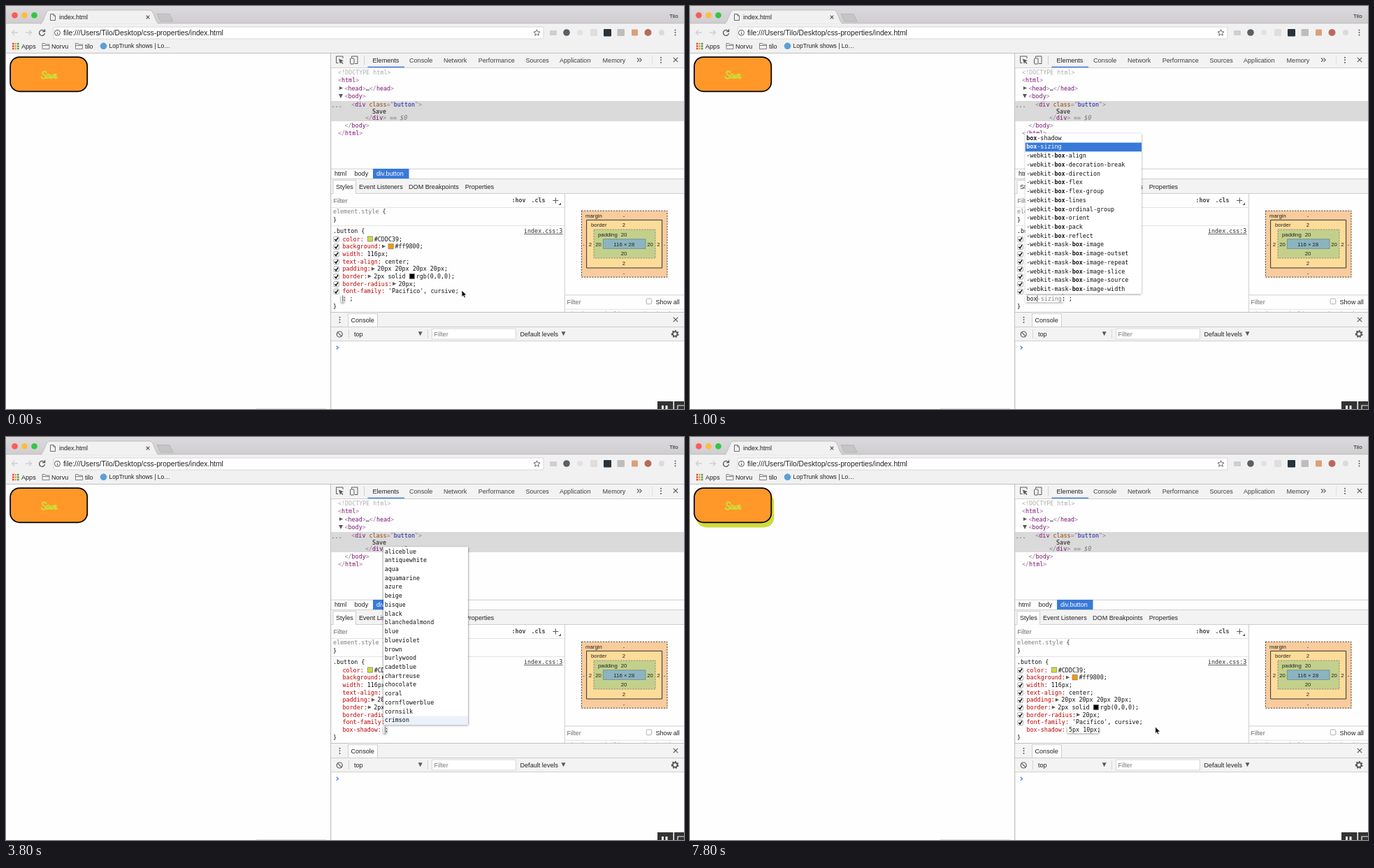
Write an HTML page with a canvas that moves like this. It is 970 by 577 pixels and loops after 8 s.

```html
<!DOCTYPE html>
<html lang="en">
<head>
<meta charset="utf-8">
<title>Box shadow in the style editor</title>
<style>
  html, body { margin: 0; width: 100%; height: 100%; overflow: hidden; background: #fefefe; }
  canvas { display: block; width: 970px; height: 577px; }
</style>
</head>
<body>
<canvas id="stage"></canvas>
<script>
const W = 970, H = 577, LOOP = 8000, TICK = 200;
const CH = 5.04, ROW = 12.73;
const MONO = '"DejaVu Sans Mono", monospace';
const SANS = '"Liberation Sans", Arial, sans-serif';
const BLUE = '#3879d9', INK = '#222', PROP = '#c00000', LINE = '#c4c4c4', PANEL = '#f3f3f3';

const canvas = document.getElementById('stage');
const ratio = window.devicePixelRatio || 1;
canvas.width = W * ratio;
canvas.height = H * ratio;
const c = canvas.getContext('2d');

// Drawing helpers; text is placed by its vertical centre.
function box(x, y, w, h, fill) {
  c.fillStyle = fill;
  c.fillRect(x, y, w, h);
}
function round(x, y, w, h, r, fill, stroke, lw = 1) {
  c.beginPath();
  c.roundRect(x, y, w, h, r);
  if (fill) { c.fillStyle = fill; c.fill(); }
  if (stroke) { c.strokeStyle = stroke; c.lineWidth = lw; c.stroke(); }
}
function dot(x, y, r, fill) {
  c.beginPath();
  c.arc(x, y, r, 0, 7);
  c.fillStyle = fill;
  c.fill();
}
function poly(points, fill, stroke, lw = 1) {
  c.beginPath();
  for (let i = 0; i < points.length; i += 2) c.lineTo(points[i], points[i + 1]);
  if (fill) { c.closePath(); c.fillStyle = fill; c.fill(); }
  if (stroke) { c.strokeStyle = stroke; c.lineWidth = lw; c.stroke(); }
}
function draw(d, color, lw = 1.2) {
  c.strokeStyle = color;
  c.lineWidth = lw;
  c.stroke(new Path2D(d));
}
function sans(s, x, y, size = 9.1, color = INK, align = 'left') {
  c.font = `${size}px ${SANS}`;
  c.textAlign = align;
  c.fillStyle = color;
  c.fillText(s, x, y + size * 0.35);
}
function mono(s, x, y, color = '#111', style = '') {
  c.font = `${style} 8.37px ${MONO}`;
  c.textAlign = 'left';
  c.fillStyle = color;
  c.fillText(s, x, y + 3);
}
function runs(x, y, ...parts) {
  for (let i = 0; i < parts.length; i += 2) {
    mono(parts[i], x, y, parts[i + 1]);
    x += parts[i].length * CH;
  }
}
const right = (x, y, color = '#5e5e5e', s = 2.6) => poly([x - s, y - s, x + s, y, x - s, y + s], color);
const down = (x, y, color = '#5a5a5a', s = 3) => poly([x - s, y - s, x + s, y - s, x, y + s], color);
const cross = (x, y, s, color) => draw(`M${x - s} ${y - s}l${2 * s} ${2 * s}m0 ${-2 * s}l${-2 * s} ${2 * s}`, color);
function dots(x, y) {
  for (let i = -1; i < 2; i++) dot(x, y + i * 3.6, 1, '#5a5a5a');
}
function check(x, y, on) {
  round(x - 3.8, y - 3.8, 7.6, 7.6, 1.5, '#fff', '#9a9a9a', 0.8);
  if (on) draw(`M${x - 2.3} ${y}l1.8 2.1 3-4.6`, '#111', 1.5);
}

function browser() {
  const sky = c.createLinearGradient(0, 0, 0, 25);
  sky.addColorStop(0, '#dcdadc');
  sky.addColorStop(1, '#cfcdcf');
  box(0, 0, W, 25, sky);
  box(0, 25, W, 42, '#f2f1f2');
  box(0, 24.5, W, 0.7, '#b5b3b5');
  c.beginPath();
  c.moveTo(49, 25.5);
  c.bezierCurveTo(55, 24, 56, 6, 62, 6);
  c.lineTo(206, 6);
  c.bezierCurveTo(212, 6, 213, 24, 219, 25.5);
  c.fillStyle = '#f2f1f2';
  c.fill();
  c.strokeStyle = '#b2b0b2';
  c.lineWidth = 0.7;
  c.stroke();
  ['#fc5b57', '#fdbc40', '#34c648'].forEach((f, i) => dot(12.5 + 14 * i, 13.3, 4.3, f));
  poly([216, 11.5, 234, 11.5, 239, 22, 221, 22, 216, 11.5], '#c6c4c6', '#aeacae', 0.7);
  draw('M63.5 11.5h4.5l2.5 2.5v6.5h-7zM68 11.5v2.5h2.5', '#5c5c5c', 0.9);
  sans('index.html', 76, 16, 9);
  cross(203, 16, 2.3, '#555');
  sans('Tilo', 949, 14.2, 8);

  draw('M17 38h-8.5m3.7-3.7l-3.7 3.7 3.7 3.7M28 38h8.5m-3.7-3.7l3.7 3.7-3.7 3.7', '#cfcfcf', 1.3);
  draw('M54.8 36a4 4 0 1 0 .7 3M55.6 33.3v3.4h-3.4', '#555', 1.3);
  round(68, 30, 701, 17, 2, '#fff', '#d0ced0', 0.8);
  draw('M69.5 38.3a4 4 0 1 0 8 0a4 4 0 1 0 -8 0M73.5 37.7v3M73.5 35.5v1', '#555', 1);
  sans('file:///Users/Tilo/Desktop/css-properties/index.html', 82, 38.3, 10.32);
  draw('M759.5 33.8l1.3 2.9 3.2.3-2.4 2.1.7 3.1-2.8-1.6-2.8 1.6.7-3.1-2.4-2.1 3.2-.3z', '#555', 0.9);
  round(778, 35, 10, 7, 1, '#cfcfcf');
  dot(802, 38, 4.8, '#5b5f66');
  dot(821, 38, 4, '#e2e2e2');
  round(836, 33, 10, 10, 1, '#dedede');
  round(855, 33, 11, 10.5, 1, '#27323a');
  round(874.5, 33, 10.5, 10, 1, '#bdbdbd');
  round(895, 33.5, 9, 9, 1, '#d9a07c');
  dot(918.5, 38, 5, '#b86a5a');
  dot(938, 38, 4, '#dadada');
  dots(957.5, 38);

  const hues = ['#e8453c', '#f0a030', '#4a9c4e', '#4285e0'];
  for (let i = 0; i < 9; i++) {
    box(9 + (i % 3) * 3.5, 52.8 + Math.floor(i / 3) * 3.5, 2.5, 2.5, hues[(i + Math.floor(i / 3)) % 4]);
  }
  sans('Apps', 22, 57.5);
  for (const x of [52, 99.5]) draw(`M${x} 61.5v-8h3.5l1 1.5h5.5v6.5zM${x} 56.5h10`, '#777', 0.9);
  sans('Norvu', 65, 57.5);
  sans('tilo', 113, 57.5);
  dot(139.5, 57.3, 4.8, '#5ba0d8');
  sans('LopTrunk shows | Lo…', 147.5, 57.5, 8.55);
  box(0, 67, W, 0.8, '#b4b2b4');
}

function page(shadow) {
  if (shadow) round(9, 79.4, 111.2, 50, 14, '#cddc39');
  round(6.1, 73.1, 110.2, 49.2, 13.2, '#ff9829', '#000', 1.7);
  c.lineCap = 'round';
  draw('M57.5 95.5C57 92.5 52 93 52.5 96.5C53 99 57 99 56.8 101.5C56.5 104.5 51 104.5 50.8 101.5' +
    'M62 98.6C60 96.5 57.7 99 58 101.5C58.5 104.3 61 103 62.2 98.8C61.8 103 62.5 104.5 64 102.5' +
    'C64.5 101 64.6 99.5 64.8 98.2C64.6 102 65.2 104 66.6 103C68 101.8 68.2 99.5 67.6 98' +
    'M69 101.3C71.5 101 72.5 98 71 97.7C69 97.5 68.3 102 70 103.2C71 103.8 72.3 103 73 102', '#cddc39', 2);
  c.lineCap = 'butt';
  box(358, 576, 100, 1, '#dedede');
}

function tree() {
  const B = '#9a7f98', T = '#7c1074', V = '#1a1aa6';
  const tag = (x, y, name, open = '<') => runs(x, y, open, B, name, T, '>', B);
  box(465, 68, 505, 20, PANEL);
  box(465, 88, 505, 0.8, LINE);
  draw('M475.5 81.5h-3v-9.5h9.5v3', '#5a5a5a', 1);
  poly([476, 75.5, 483, 78.3, 480, 79.3, 482.5, 82, 481.4, 83, 479, 80.5, 478, 83], '#5a5a5a');
  draw('M494.5 74v-2h8.5v10.5h-4', '#5a5a5a', 1);
  round(492.5, 75, 5.5, 8, 0.8, PANEL, '#5a5a5a', 1);
  box(512, 71, 0.8, 13, '#c8c8c8');
  const tabs = { Elements: 524.5, Console: 577, Network: 626, Performance: 675.7, Sources: 743.5, Application: 792, Memory: 853.5 };
  for (const name in tabs) sans(name, tabs[name], 77.5, 9.1, name === 'Elements' ? INK : '#404040');
  box(517.5, 86.6, 52.5, 1.6, '#4a86df');
  draw('M903 74.5l2.7 2.7-2.7 2.7m3.5-5.4l2.7 2.7-2.7 2.7', '#5a5a5a', 1.1);
  box(924, 71, 0.8, 13, '#dcdcdc');
  dots(937, 77.3);
  cross(958, 77, 3.2, '#5a5a5a');

  box(465, 136, 505, 29, '#dadada');
  mono('<!DOCTYPE html>', 475, 95, '#b0b0b0');
  tag(475, 106, 'html');
  right(479.5, 117.5);
  tag(484.5, 118, 'head');
  mono('…', 514.7, 118);
  tag(519.8, 118, 'head', '</');
  down(479, 129);
  tag(484.5, 129, 'body');
  mono('...', 465.5, 142, '#555');
  runs(494.3, 141, '<', B, 'div', T, ' class', '#994500', '="', B, 'button', V, '">', B);
  mono('Save', 524, 150.5);
  tag(514, 160, 'div', '</');
  mono('== $0', 549, 160, '#777', 'italic');
  tag(484.5, 170.5, 'body', '</');
  tag(475, 181.5, 'html', '</');

  box(465, 232.8, 505, 0.8, LINE);
  box(525, 233, 51.5, 14, BLUE);
  sans('html', 470, 240);
  sans('body', 498.5, 240);
  sans('div.button', 530, 240, 9.1, '#fff');
  box(465, 247.2, 505, 0.8, LINE);
}

function rules(showChecks) {
  box(465, 248, 505, 20, PANEL);
  box(465, 268, 505, 0.8, LINE);
  box(468, 249.5, 32.5, 19.4, '#fefefe');
  draw('M468 268.4v-18.9h32.5v18.9', LINE, 0.8);
  sans('Styles', 472, 259);
  sans('Event Listeners', 505, 259);
  sans('DOM Breakpoints', 576, 259);
  sans('Properties', 656.7, 259);
  sans('Filter', 468.5, 278.5, 9.1, '#6c6c6c');
  mono(':hov', 723.5, 278, '#444', 'bold');
  mono('.cls', 751.5, 278, '#444', 'bold');
  draw('M782.3 278.5h8m-4-4v8', '#5a5a5a', 1.1);
  poly([790.5, 285, 794, 285, 794, 281.5], '#5a5a5a');
  box(465, 288, 334, 0.8, '#dcdcdc');
  box(799, 268, 0.8, 170, LINE);
  runs(468, 294, 'element.style', '#808080', ' {', INK);
  mono('}', 468, 306);
  box(465, 314, 334, 0.8, '#dcdcdc');
  mono('.button {', 468, 322);
  mono('index.css:3', 741, 322, '#333');
  box(741, 326, 55.5, 0.8, '#444');

  // name, value, has an arrow, swatch colour, text before the swatch
  const list = [
    ['color', '#CDDC39;', 0, '#cddc39', ''],
    ['background', '#ff9800;', 1, '#ff9800', ''],
    ['width', '116px;'],
    ['text-align', 'center;'],
    ['padding', '20px 20px 20px 20px;', 1],
    ['border', 'rgb(0,0,0);', 1, '#000', '2px solid '],
    ['border-radius', '20px;', 1],
    ['font-family', "'Pacifico', cursive;"]
  ];
  list.forEach(([name, value, arrow, swatch, lead = ''], i) => {
    const y = 333.5 + 10.7 * i;
    let x = 481.5 + (name.length + 1) * CH;
    if (showChecks) check(472.6, y + 0.5, true);
    runs(481.5, y, name, PROP, ':', PROP);
    if (arrow) right(x + 3.6, y);
    x += arrow ? 9.5 : CH;
    mono(lead, x, y);
    x += lead.length * CH;
    if (swatch) {
      round(x + 0.6, y - 3.6, 7.2, 7.2, 0, swatch, '#777', 0.7);
      x += 10;
    }
    mono(value, x, y);
  });
  mono('}', 468, 430);
}

function boxModel() {
  const label = (s, x, y) => sans(s, x, y, 7.8, '#222', 'center');
  c.setLineDash([2.2, 1.6]);
  round(823.4, 293.2, 122.6, 95, 0, '#f9cc9d', '#333', 0.9);
  c.setLineDash([]);
  round(830.6, 306.4, 108, 68.6, 0, '#fddc9a', '#222', 0.9);
  c.setLineDash([2.2, 1.6]);
  round(841, 320, 88, 41, 0, '#c3d08b', '#777', 0.8);
  c.setLineDash([]);
  round(854.4, 333.8, 60.6, 13.6, 0, '#8cb4c0', '#6d8a90', 0.8);
  sans('margin', 829, 300, 7.8);
  sans('border', 837, 313.7, 7.8);
  sans('padding', 847, 327, 7.8);
  label('116 × 28', 884.3, 341);
  [['-', 300, 382, 826.5, 942], ['2', 313.7, 368, 836, 933.5], ['20', 327, 354.5, 847.5, 921.5]].forEach(([s, top, bottom, left, far]) => {
    label(s, 884, top);
    label(s, 884, bottom);
    label(s, left, 341);
    label(s, far, 341);
  });
  box(799, 413.5, 171, 0.8, LINE);
  sans('Filter', 802.5, 424.2, 9.1, '#6c6c6c');
  check(920, 422.8, false);
  sans('Show all', 929.5, 424.2);
  box(799, 433.8, 171, 0.8, '#dcdcdc');
  c.save();
  c.beginPath();
  c.rect(800, 434, 170, 4);
  c.clip();
  mono('background-clip', 809, 441, '#aaa');
  mono('border-box', 913, 441, '#aaa');
  c.restore();
}

function drawer() {
  box(465, 438, 505, 41.5, PANEL);
  box(465, 438, 505, 0.8, '#b4b4b4');
  dots(477.5, 449.3);
  box(489.5, 439, 42, 20.5, '#fefefe');
  draw('M489.5 459v-18.5h42v18.5', LINE, 0.8);
  sans('Console', 493.5, 450.3);
  cross(958, 449, 3.2, '#5a5a5a');
  box(465, 459, 505, 0.8, LINE);
  draw('M473.2 470a4 4 0 1 0 8 0a4 4 0 1 0-8 0M474.4 467.2l5.6 5.6', '#5a5a5a', 1.2);
  box(490, 463, 0.8, 13, '#cecece');
  sans('top', 498, 470);
  down(592.7, 469.2);
  box(603, 463, 0.8, 13, '#cecece');
  round(609.4, 462, 120, 15, 0, '#fff', '#cfcfcf', 0.8);
  sans('Filter', 612.5, 470, 9.1, '#777');
  sans('Default levels', 735.5, 470);
  down(797.5, 469.2);
  c.setLineDash([1.9, 1.9]);
  draw('M952.7 469.5a4.5 4.5 0 1 0 9 0a4.5 4.5 0 1 0-9 0', '#5a5a5a', 2);
  c.setLineDash([]);
  draw('M953.9 469.5a3.3 3.3 0 1 0 6.6 0a3.3 3.3 0 1 0-6.6 0', '#5a5a5a', 2);
  box(465, 479.3, 505, 0.8, LINE);
  draw('M472.8 486.8l2.6 2.4-2.6 2.4', '#4a80e0', 1.3);
}

function player() {
  box(932, 566, 22.5, 11, '#333');
  box(956, 566, 14, 11, '#333');
  box(938, 572, 3, 5, '#eee');
  box(943.5, 572, 3, 5, '#eee');
  draw('M961 577v-5h9', '#eee', 1.2);
}

function lift(on) {
  c.shadowColor = on ? 'rgba(0,0,0,.6)' : 'transparent';
  c.shadowBlur = on ? 3 * ratio : 0;
  c.shadowOffsetY = on ? ratio : 0;
}

function field(x, typed, ghost, tail, caret) {
  const end = x + (typed + ghost).length * CH;
  lift(true);
  box(x - 2, 414, end - x + 4.3, 10.3, '#fff');
  lift(false);
  if (caret) box(x + typed.length * CH - 0.1, 414.5, 0.8, 9, '#222');
  runs(x, 419, typed, '#111', ghost, '#808080', tail, '#111');
}

function popup({ x = 479.5, y, w, h, first, items, match = '', pick, hover, thumb }) {
  lift(true);
  box(x, y, w, h, '#fff');
  lift(false);
  c.save();
  c.beginPath();
  c.rect(x, y, w, h);
  c.clip();
  items.forEach((item, i) => {
    const cy = first + ROW * i, chosen = item === pick;
    if (chosen) box(x, cy - 5.8, w, ROW, BLUE);
    else if (hover && i === items.length - 1) box(x, cy - 5.8, w, ROW, '#eaf1fb');
    const at = match ? item.indexOf(match) : 0;
    const ink = chosen ? '#fff' : '#111';
    mono(item.slice(0, at), x + 1.7, cy, ink);
    mono(match, x + 1.7 + at * CH, cy, ink, 'bold');
    mono(item.slice(at + match.length), x + 1.7 + (at + match.length) * CH, cy, ink);
  });
  if (thumb) round(x + w - 5.7, 168, 4.7, 25.5, 2, '#8c8c8c');
  c.restore();
}

function pointer(x, y) {
  poly([x, y, x, y + 9.6, x + 2.2, y + 7.6, x + 3.7, y + 11, x + 5.4, y + 10.2, x + 4, y + 7, x + 6.9, y + 6.8, x, y], '#111', '#fff', 0.7);
}

const under = (stem, tails) => tails.split(' ').map(s => stem + s);
const bottoms = under('border-bottom', ' -color -left-radius -right-radius -style -width');
const letterB = [
  ...under('background-', 'image origin position position-x position-y repeat repeat-x repeat-y size'),
  'block-size', 'border', ...bottoms, ...under('border-', 'collapse color image image-outset')
];
const letterBo = [
  'border', ...bottoms, 'border-collapse', 'border-color',
  ...under('border-image', ' -outset -repeat -slice -source -width'),
  ...under('border-left', ' -color -style -width'), 'border-radius'
];
const boxes = [
  'box-shadow', 'box-sizing',
  ...under('-webkit-box-', 'align decoration-break direction flex flex-group lines ordinal-group orient pack reflect'),
  ...under('-webkit-mask-box-image', ' -outset -repeat -slice -source -width')
];
const colors = ('aliceblue antiquewhite aqua aquamarine azure beige bisque black blanchedalmond blue blueviolet brown ' +
  'burlywood cadetblue chartreuse chocolate coral cornflowerblue cornsilk crimson').split(' ');

const tall = { y: 157.3, w: 191.5, h: 255, hover: true, thumb: true };
const long = { y: 182.3, w: 166.5, h: 230, first: 188.7, items: boxes, pick: 'box-sizing' };
const pair = { y: 426.5, w: 70, h: 26.5, first: 433, items: boxes.slice(0, 2), match: 'box-s' };
const palette = { x: 540, y: 157.3, w: 121, h: 255, first: 163.5, items: colors, hover: true };

const steps = [
  { at: 0, typed: '' },
  { at: 400, typed: 'b', ghost: 'order', list: { ...tall, first: 157.3, items: letterB, match: 'b', pick: 'border' } },
  { at: 800, typed: 'bo', ghost: 'rder', list: { ...tall, first: 163.5, items: letterBo, match: 'bo', pick: 'border' } },
  { at: 1000, typed: 'box', ghost: '-sizing', list: { ...long, match: 'box' } },
  { at: 1600, typed: 'box-', ghost: 'sizing', list: { ...long, match: 'box-' } },
  { at: 2000, typed: 'box-s', ghost: 'izing', list: { ...pair, pick: 'box-sizing' } },
  { at: 2200, typed: 'box-s', ghost: 'hadow', list: { ...pair, pick: 'box-shadow' } },
  { at: 2600, value: '', list: palette },
  { at: 4200, value: '5' },
  { at: 4400, value: '5p' },
  { at: 4600, value: '5px' },
  { at: 4800, value: '5px ' },
  { at: 6000, value: '5px 1' },
  { at: 6200, value: '5px 10' },
  { at: 6600, value: '5px 10p' },
  { at: 6800, value: '5px 10px' }
];

function render(t) {
  const step = steps.findLast(s => s.at <= t);
  const { typed, ghost = '', value, list } = step;
  c.setTransform(ratio, 0, 0, ratio, 0, 0);
  box(0, 0, W, H, '#fefefe');
  browser();
  page(value === '5px 10px');
  box(464.3, 67.5, 0.9, H, '#a8a8a8');
  tree();
  rules(!(list && list.hover));
  boxModel();
  drawer();
  player();
  if (value === undefined) {
    field(481.5, typed, ghost, ': ;', true);
  } else {
    mono('box-shadow:', 481.5, 419, PROP);
    field(542, value, '', ';', t < 7400);
  }
  if (list) popup(list);
  if (t < 400) pointer(652, 407);
  if (t >= 7400) {
    const k = Math.min(1, (t - 7400) / 400);
    pointer(652 + 13.7 * k, 407 + 8 * k);
  }
}

function frame() {
  const t = performance.now() % LOOP;
  render(Math.floor(t / TICK) * TICK);
  requestAnimationFrame(frame);
}
frame();
</script>
</body>
</html>
```
